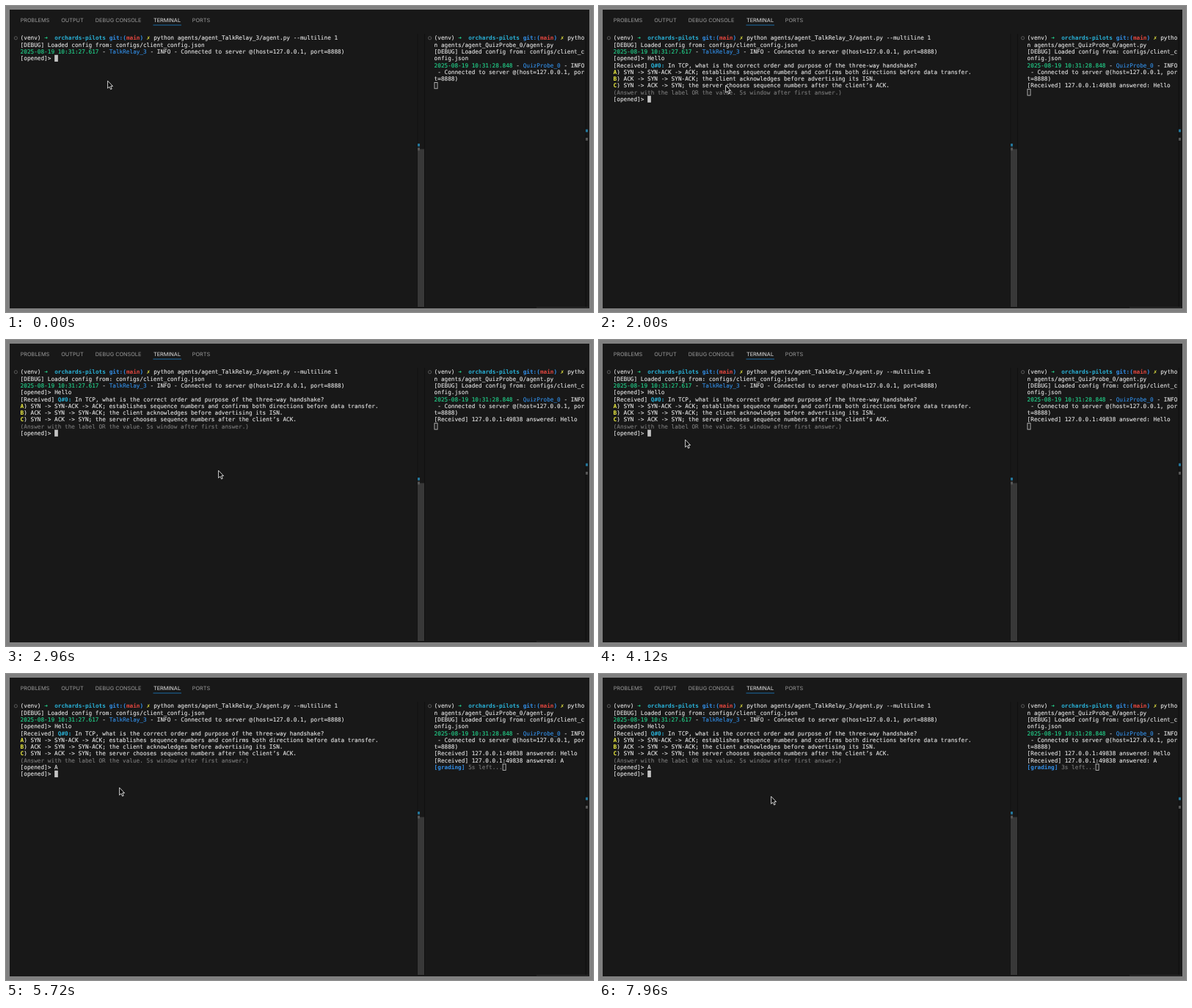
An HTML page that plays this animation: 800x418 px, repeating every 8 s.

```html
<!DOCTYPE html>
<html lang="en">
<head>
<meta charset="utf-8">
<title>Terminal session</title>
<style>
html, body { margin: 0; width: 100%; height: 100%; overflow: hidden; background: #808080; }
svg { display: block; width: 800px; height: 418px; }
text { white-space: pre; text-rendering: geometricPrecision; color: #e8e8e8; fill: currentColor; }
.term text { font: 7.732px "DejaVu Sans Mono", monospace; stroke: currentColor; stroke-width: .1; }
.tabs text { font: 7.3px Inter, sans-serif; color: #9b9b9b; }
.tabs .on { color: #e6e6e6; }
.term .b { font-weight: bold; stroke: none; }
.term .green { color: #23d88f; }
.term .blue { color: #328fe8; }
.term .cyan { color: #29b2d8; }
.term .red { color: #e2463f; }
.term .yellow { color: #f0f043; }
.term .dim { color: #7a7a7a; }
</style>
</head>
<body>
<svg id="stage" viewBox="0 0 800 418">
  <rect width="800" height="418" fill="#808080"/>
  <rect x="5" y="5" width="790" height="408" fill="#181818"/>
  <g class="tabs">
    <text x="19.7" y="21.7">PROBLEMS</text>
    <text x="75.2" y="21.7">OUTPUT</text>
    <text x="121.8" y="21.7">DEBUG CONSOLE</text>
    <text x="201" y="21.7" class="on">TERMINAL</text>
    <text x="253.8" y="21.7">PORTS</text>
    <rect x="200.5" y="25.6" width="38.5" height=".9" fill="#1a74b4"/>
  </g>
  <g fill="#101010">
    <rect x="560.5" y="38" width="1" height="373"/>
    <rect x="570" y="38" width="1" height="373"/>
    <rect x="789.7" y="38" width="1" height="373"/>
  </g>
  <rect x="561" y="195.5" width="9" height="215.5" fill="#383838"/>
  <rect x="723" y="411.3" width="71" height="1" fill="#303030"/>
  <g fill="#23759a">
    <rect x="561" y="188" width="3" height="3.8"/>
    <rect x="790" y="168.5" width="3" height="3.8"/>
  </g>
  <g fill="#565656">
    <rect x="561" y="193.5" width="3" height="3.8"/>
    <rect x="790" y="180" width="3" height="3.8"/>
  </g>
  <g fill="none" stroke="#6a6a6a" stroke-width=".8">
    <circle cx="13.4" cy="43.8" r="2.1"/>
    <circle cx="577.6" cy="43.8" r="2.1"/>
  </g>
  <g class="term" id="term"></g>
  <rect id="block" width="4.7" height="9.2" fill="#c4c4c4"/>
  <rect id="hollow" width="4" height="8.4" fill="none" stroke="#cfcfcf" stroke-width=".8"/>
  <path id="mouse" d="M0 0V10.2L2.3 8.1L4 11.7L5.6 11L4.1 7.4H7Z" fill="#0a0a0a" stroke="#f0f0f0" stroke-width=".85" stroke-linejoin="round"/>
</svg>
<script>
const LOOP = 8000, CHAR = 4.655, ROW = 9.3, TOP = 38.9, BASE = 46.3;
const LEFT = 19.6, RIGHT = 583.6;
const ENTER = 1600, ASK = 1680, PICK = 4600, SENT = 5160, COUNT = 5200;
const KEYS = [760, 960, 1120, 1260, 1400];
const $ = id => document.getElementById(id);
const timed = [];

function addText(x, row, col, str, cls) {
  const el = document.createElementNS("http://www.w3.org/2000/svg", "text");
  el.setAttribute("x", x + col * CHAR);
  el.setAttribute("y", BASE + row * ROW);
  if (cls) el.setAttribute("class", cls);
  el.textContent = str;
  $("term").append(el);
  return el;
}

// Each part is plain text or [text, class]
function line(x, row, parts, from = 0, to = LOOP) {
  let col = 0;
  for (const part of parts) {
    const [str, cls] = [].concat(part);
    const el = addText(x, row, col, str, cls);
    if (from > 0 || to < LOOP) timed.push({ el, from, to });
    col += str.length;
  }
}

const prompt = cmd => [
  "(venv) ", ["➜", "b green"], "  ", ["orchards-pilots", "b cyan"], " ",
  ["git:(", "b blue"], ["main", "b red"], [")", "b blue"], " ", ["✗", "b yellow"], " " + cmd
];
const logLine = (time, name, rest) => [[time, "green"], " - ", [name, "blue"], " - INFO" + rest];
const choice = (label, rest) => [[label, "b yellow"], ") " + rest];

line(LEFT, 0, prompt("python agents/agent_TalkRelay_3/agent.py --multiline 1"));
line(LEFT, 1, ["[DEBUG] Loaded config from: configs/client_config.json"]);
line(LEFT, 2, logLine("2025-08-19 10:31:27.617", "TalkRelay_3", " - Connected to server @(host=127.0.0.1, port=8888)"));
line(LEFT, 3, ["[opened]> "]);
line(LEFT, 4, ["[opened]> "], ENTER, ASK);
[
  ["[Received] ", ["Q#0:", "b cyan"], " In TCP, what is the correct order and purpose of the three-way handshake?"],
  choice("A", "SYN -> SYN-ACK -> ACK; establishes sequence numbers and confirms both directions before data transfer."),
  choice("B", "ACK -> SYN -> SYN-ACK; the client acknowledges before advertising its ISN."),
  choice("C", "SYN -> ACK -> SYN; the server chooses sequence numbers after the client’s ACK."),
  [["(Answer with the label OR the value. 5s window after first answer.)", "dim"]],
  ["[opened]> "]
].forEach((parts, i) => line(LEFT, 4 + i, parts, ASK));
line(LEFT, 9, ["          A"], PICK);
line(LEFT, 10, ["[opened]> "], SENT);

line(RIGHT, 0, prompt("pytho"));
line(RIGHT, 1, ["n agents/agent_QuizProbe_0/agent.py"]);
line(RIGHT, 2, ["[DEBUG] Loaded config from: configs/client_c"]);
line(RIGHT, 3, ["onfig.json"]);
line(RIGHT, 4, logLine("2025-08-19 10:31:28.848", "QuizProbe_0", ""));
line(RIGHT, 5, [" - Connected to server @(host=127.0.0.1, por"]);
line(RIGHT, 6, ["t=8888)"]);
line(RIGHT, 7, ["[Received] 127.0.0.1:49838 answered: Hello"], ASK);
line(RIGHT, 8, ["[Received] 127.0.0.1:49838 answered: A"], SENT);
line(RIGHT, 9, [["[grading]", "b blue"]], COUNT);

const typed = addText(LEFT, 3, 10, "");
const left = addText(RIGHT, 9, 10, "", "dim");

// Pointer stops: time, x, y
const path = [
  [0, 138, 102], [1720, 138, 102], [2000, 172, 108], [2480, 320, 147],
  [2680, 320, 147], [2960, 289, 178], [3120, 136, 150], [3320, 136, 150],
  [4120, 117, 136], [5280, 117, 136], [5720, 154, 155], [6000, 154, 155],
  [6800, 234, 167], [LOOP, 234, 167]
];

function pointer(t) {
  const i = path.findIndex(p => p[0] > t);
  const [t0, x0, y0] = path[i - 1], [t1, x1, y1] = path[i];
  const u = (t - t0) / (t1 - t0), e = u * u * (3 - 2 * u);
  return [x0 + (x1 - x0) * e, y0 + (y1 - y0) * e];
}

const place = (id, x, y) => $(id).setAttribute("transform", `translate(${x} ${y})`);
const show = (el, on) => el.setAttribute("visibility", on ? "visible" : "hidden");

function draw(t) {
  for (const item of timed) show(item.el, t >= item.from && t < item.to);

  const count = KEYS.filter(k => t >= k).length;
  typed.textContent = "Hello".slice(0, count);
  left.textContent = t < COUNT ? "" : `${5 - Math.floor((t - COUNT) / 1000)}s left...`;

  const row = t < ENTER ? 3 : t < ASK ? 4 : t < SENT ? 9 : 10;
  const col = t < ENTER ? 10 + count : t >= PICK && t < SENT ? 11 : 10;
  place("block", LEFT + col * CHAR, TOP + row * ROW);

  const grading = t >= COUNT;
  const rightRow = t < ASK ? 7 : t < SENT ? 8 : 9;
  place("hollow", RIGHT + (grading ? 20 * CHAR : 0) + 0.4, TOP + rightRow * ROW + 0.4);

  const typing = (t >= KEYS[0] && t < 1720) || (t >= PICK && t < 5280);
  show($("mouse"), !typing);
  const [x, y] = pointer(t);
  place("mouse", x + 0.6, y + 0.2);
}

const start = performance.now();
function tick() {
  draw((performance.now() - start) % LOOP);
  requestAnimationFrame(tick);
}
tick();
</script>
</body>
</html>
```
